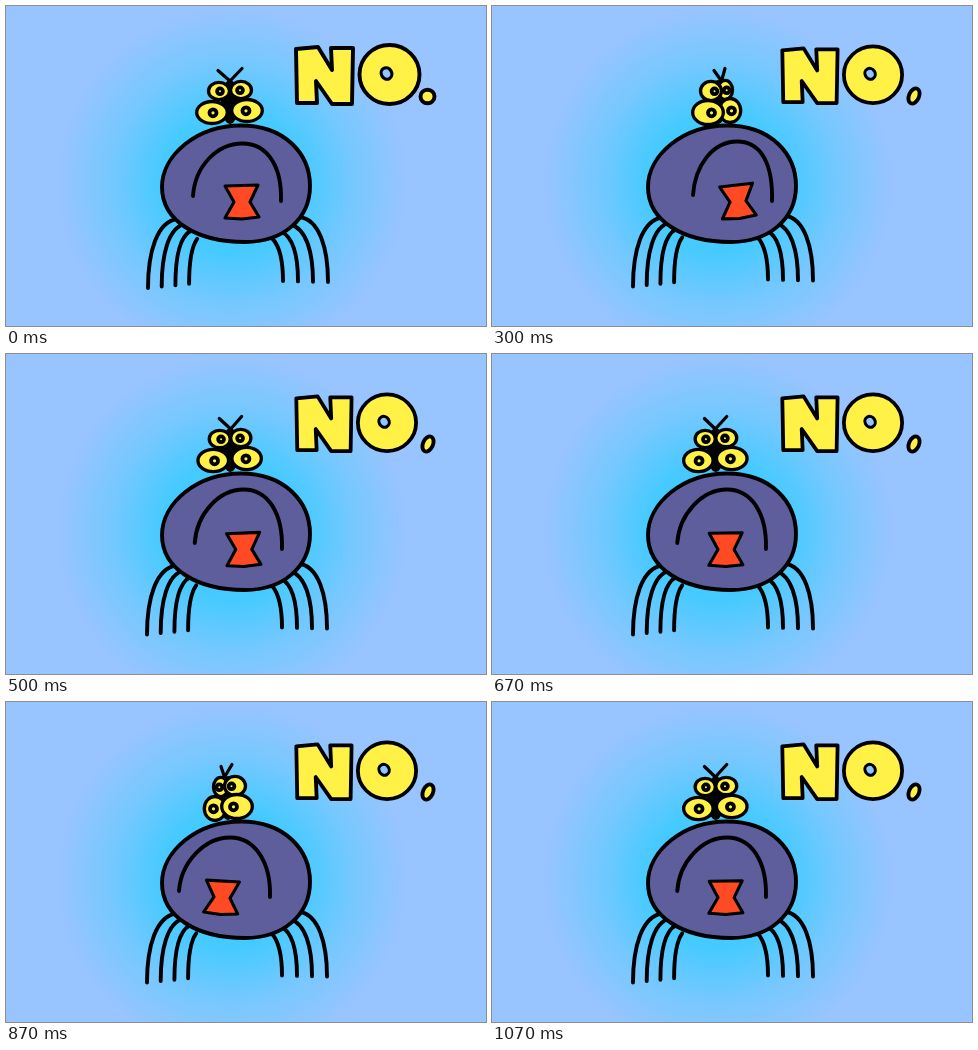
Recreate the animation shown at these times as an HTML page. Size 480 by 320 pixels, loop 1140 ms.

```html
<!DOCTYPE html>
<html lang="en">
<head>
<meta charset="utf-8">
<title>No.</title>
<style>
  html, body { margin: 0; width: 100%; height: 100%; overflow: hidden; background: #98c4ff; }
  svg { display: block; width: 100vw; height: 100vh; }
  .ink { fill: none; stroke: #000; stroke-width: 3.9; stroke-linecap: round; stroke-linejoin: round; }
  .yellow { fill: #fff145; }
  .body { fill: #5f5e9c; }
  .lips { fill: #ff4a24; stroke-width: 3.1; }
  .hole { fill: #91c5ff; stroke-width: 3.2; }
  .eye { stroke-width: 3.3; }
  .pupil { stroke-width: 3.8; }
  .feeler { stroke-width: 3.2; }
</style>
</head>
<body>
<svg viewBox="0 0 480 320" role="img" aria-label="A spider shaking its head: NO.">
  <defs>
    <radialGradient id="glow" gradientUnits="userSpaceOnUse" cx="226" cy="177" r="174">
      <stop offset="0" stop-color="#35cbff"/>
      <stop offset=".4" stop-color="#46caff"/>
      <stop offset=".7" stop-color="#76c8ff"/>
      <stop offset="1" stop-color="#98c4ff"/>
    </radialGradient>
  </defs>
  <rect width="480" height="320" fill="url(#glow)"/>
  <g id="scene"></g>
</svg>
<script>
const scene = document.getElementById('scene');
const HALF_LOOP = 570, STEP = 100, STEPS = 6;
const MIDDLE = 224;

const path = (d, cls = '') => `<path class="ink ${cls}" d="${d}"/>`;
const oval = (x, y, rx, ry, cls, tilt = 0) =>
  `<ellipse class="ink ${cls}" cx="${x}" cy="${y}" rx="${rx}" ry="${ry}" transform="rotate(${tilt} ${x} ${y})"/>`;
const group = (transform, content) => `<g transform="${transform}">${content}</g>`;

// Parts on both sides of the head close in on the middle as it turns away.
const gather = (turn, side) => 3.5 * turn - side * 6.5 * Math.abs(turn);

function drawText(wobble) {
  const letters =
    path('M290 43L312 41L326 64L325 42L347 42L346 98L326 98L310 75L311 97L291 97Z', 'yellow') +
    oval(383.5, 68.5, 30, 29.5, 'yellow') +
    oval(380.5, 67.5, 5.2, 5.8, 'hole', -30);
  const stop = wobble ? oval(422, 90, 5, 8, 'yellow', 24) : oval(421.5, 90.5, 7, 6.8, 'yellow');
  return group(wobble ? 'translate(9 3) scale(.97 .96)' : '', letters) + stop;
}

function drawLeg(x, y, footX, footY, i) {
  const kneeX = x + (footX - x) * 0.72;
  return path(`M${x} ${y}C${kneeX} ${y + 2 + 2 * i} ${footX} ${(y + footY) / 2} ${footX} ${footY}`);
}

function drawLegs(wobble) {
  let legs = '';
  for (let i = 0; i < 4; i++) {
    legs += drawLeg(172 + 6.4 * i, 213 + 4.5 * i + 0.7 * i * i, 142 + 13.7 * i, 282 - 1.4 * i, i);
    legs += drawLeg(293 - 8.8 * i, 211 + 7.3 * i, 322 - 15 * i, 276 - 0.3 * i, i);
  }
  return group(`translate(${-wobble} ${-1.5 * wobble})`, legs);
}

function drawEye(turn, side, x, y, rx, ry, scale) {
  const cx = x + gather(turn, side) * scale;
  const away = Math.max(0, side * turn);
  const r = 2 + 1.5 * scale;
  return oval(cx, y, rx * (1 - 0.3 * away), ry + Math.abs(turn), 'eye yellow') +
    oval(cx - side + 2.5 * turn, y + 0.3, r, r, 'pupil');
}

function drawHead(turn) {
  const near = turn > 0 ? -1 : 1;
  const pair = draw => draw(-near) + draw(near);
  const feeler = side =>
    path(`M${MIDDLE + 5.5 * turn} 75L${MIDDLE + 12 * side + gather(turn, side)} ${63.5 - side}`, 'feeler');
  return pair(feeler) +
    `<ellipse cx="${MIDDLE + 2 * turn}" cy="96" rx="9" ry="22"/>` +
    pair(side => drawEye(turn, side, MIDDLE + 11 * side, 84.5 - side / 2, 10.5, 8.6, 0.6)) +
    pair(side => drawEye(turn, side, MIDDLE - 0.5 + 17.5 * side, 105.5 - side, 15.3, 11, 1));
}

function drawMouth(turn, wobble) {
  const left = 187 + 14 * turn;
  const right = 275 + 8 * turn - 3 * turn * turn;
  const peak = left + (right - left) * 0.56;
  const top = 137.5 - 2 * wobble;
  const lipShift = 15 * turn - 5 * turn * turn;
  const lips = path('M219 180L252 179L244 196L253 211L236 213L219 212L228 196Z', 'lips');
  return path(`M${left} ${190 - wobble}C${left + 2} 160 ${peak - 25} ${top} ${peak} ${top}` +
      `S${right + 1} 160 ${right} 195`) +
    group(`translate(${lipShift} ${-0.5 * wobble}) rotate(${-5 * turn} 236 196)`, lips);
}

function drawScene(step) {
  const wobble = step % 2;
  const turn = Math.sin(Math.PI * step / STEPS) ** 3;
  scene.innerHTML = drawText(wobble) + drawLegs(wobble) + drawHead(turn) +
    path('M156 181C156 149 191 119.5 235 119.5C279 119.5 304 148 304 180' +
      'C304 213 277 236 239 236C191 236 156 215 156 181Z', 'body') +
    drawMouth(turn, wobble);
}

let start, shown;
function tick(now) {
  start ??= now;
  const t = (now - start) % (2 * HALF_LOOP);
  const step = Math.floor(t / HALF_LOOP) * STEPS + Math.floor(t % HALF_LOOP / STEP);
  if (step !== shown) drawScene(shown = step);
  requestAnimationFrame(tick);
}
drawScene(0);
requestAnimationFrame(tick);
</script>
</body>
</html>
```
